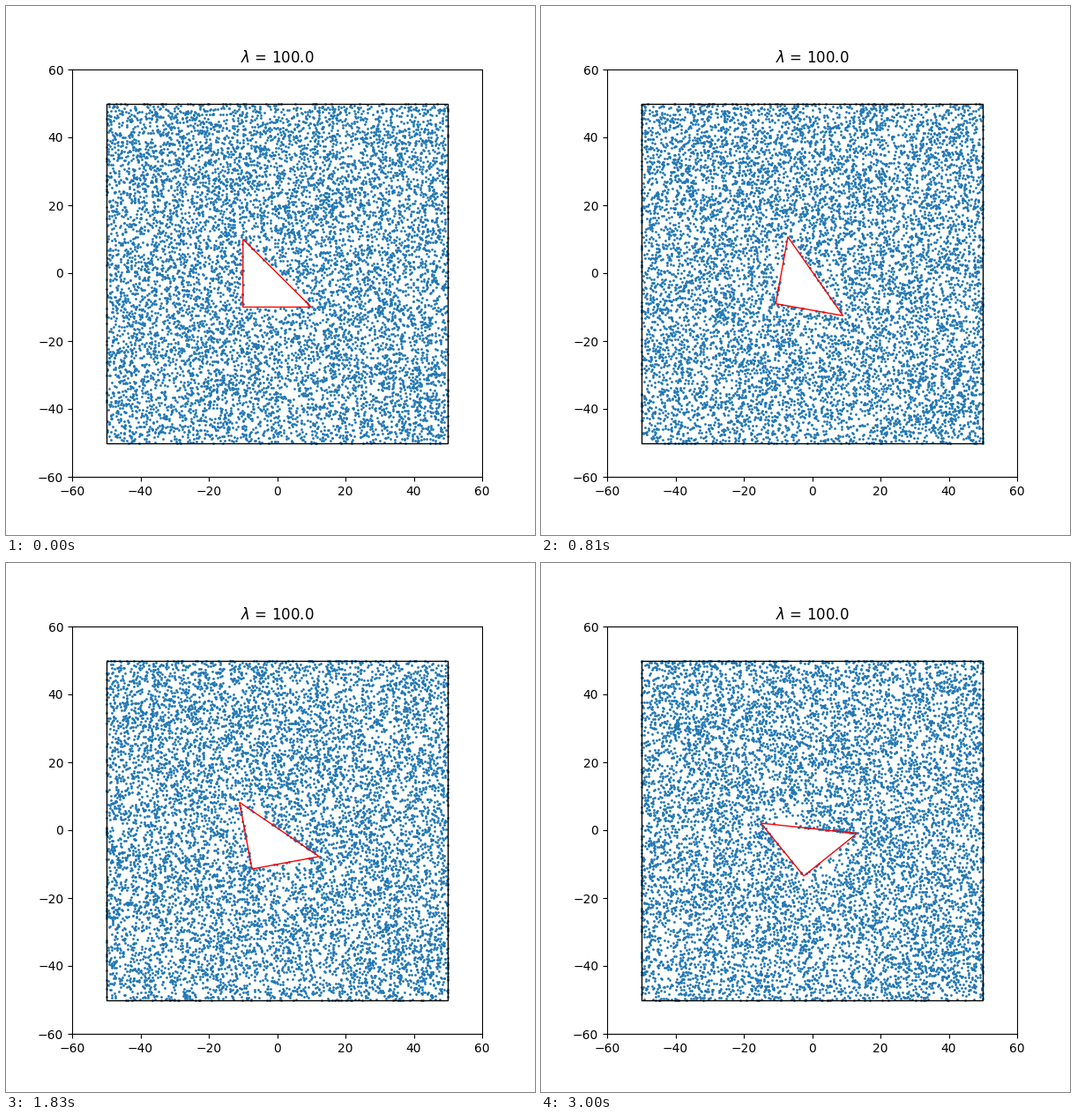
Animation, 600 px wide and 600 px high, one loop 3.03 s. Source, as a matplotlib script:

```python
import numpy as np
import matplotlib.pyplot as plt
from matplotlib.animation import FuncAnimation
from matplotlib.patches import Polygon, Rectangle

FRAMES, INTERVAL = 101, 30
COUNT, HALF, LEG = 10000, 50, 20
STEP = 0.6
RATE = 100.0

# Right-angled triangle around its centroid
SHAPE = LEG * (np.eye(3, 2) - 1 / 3)


def pose(i):
    """Centroid and rotation: a wobbling drift, a dip, then a steady turn."""
    s = i / (FRAMES - 1)
    wobble = -0.5 * s * np.sin(3 * np.pi * s)
    centre = -LEG / 6 + np.array([1.9, -0.8]) * s + wobble
    angle = np.radians(38.9 * s - 20.7 * np.sin(np.pi * np.sqrt(s)))
    c, s = np.cos(angle), np.sin(angle)
    return centre, np.array([[c, -s], [s, c]])


def corners(i):
    centre, rot = pose(i)
    return centre + SHAPE @ rot.T


def push_out(points, i):
    """Move points inside the triangle to its nearest side."""
    centre, rot = pose(i)
    u, v = ((points - centre) @ rot + LEG / 3).T
    slack = (LEG - u - v) / 2
    gap = np.stack([u, v, slack * np.sqrt(2)])
    side = np.where((gap > 0).all(axis=0), gap.argmin(axis=0), -1)
    u, v = (np.where(side == k, 0, w + slack * (side == 2))
            for k, w in enumerate((u, v)))
    return centre + (np.stack([u, v], axis=1) - LEG / 3) @ rot.T


def simulate():
    rng = np.random.default_rng(7)
    points = rng.uniform(-HALF, HALF, (COUNT, 2))
    blocked = (points > -LEG / 2).all(axis=1) & (points.sum(axis=1) < 0)
    points = points[~blocked]
    path = []
    for i in range(FRAMES):
        points = points + rng.normal(0, STEP, points.shape)
        points = push_out(np.clip(points, -HALF, HALF - 1e-6), i)
        path.append(points)
    return path


path = simulate()

fig, ax = plt.subplots(figsize=(6, 6), dpi=100)
ax.set(xlim=(-60, 60), ylim=(-60, 60))
ax.set_title(rf"$\lambda$ = {RATE}")
dots, = ax.plot([], [], "o", ms=1, color="tab:blue", zorder=2)
ax.add_patch(Rectangle((-HALF, -HALF), 2 * HALF, 2 * HALF,
                       fill=False, ec="black", lw=1, zorder=3))
triangle = ax.add_patch(Polygon(corners(0), fill=False, ec="red", lw=1, zorder=3))


def update(i):
    dots.set_data(*path[i].T)
    triangle.set_xy(corners(i))
    return dots, triangle


anim = FuncAnimation(fig, update, frames=FRAMES, interval=INTERVAL,
                     init_func=lambda: update(0), repeat=True, repeat_delay=0)
plt.show()
```
